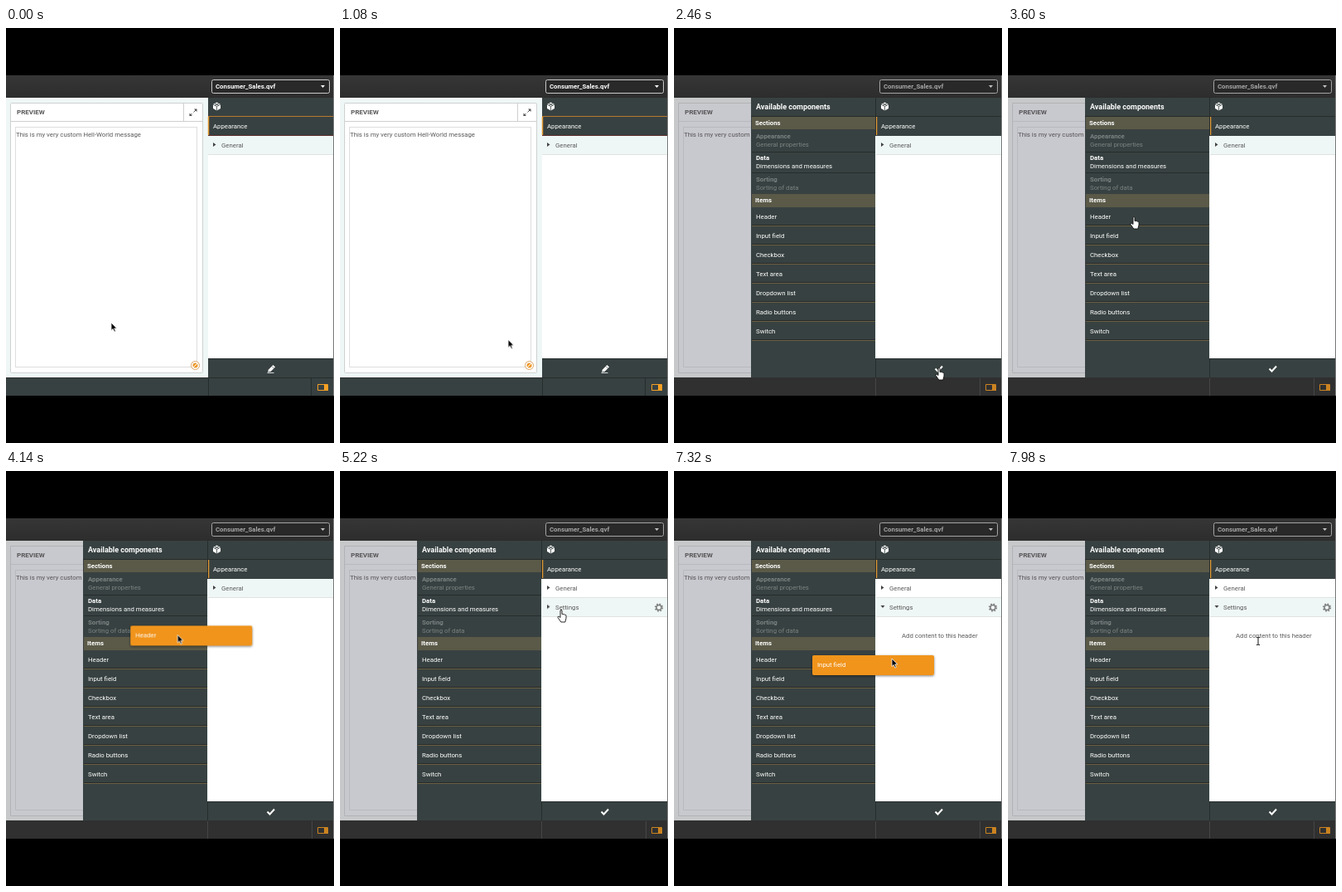
Write an HTML page that moves like this. It is 396 px wide and 500 px high and loops after 8000 ms.

```html
<!DOCTYPE html>
<html lang="en">
<head>
<meta charset="utf-8">
<title>Component editor</title>
<style>
  html, body { margin: 0; width: 100%; height: 100%; overflow: hidden; background: #000; }
  svg { display: block; width: 396px; height: 500px; font: 7.8px Roboto, Arial, sans-serif; }
  .bold { font-weight: 700; }
  .title { font-size: 9px; font-weight: 700; }
  .panel { fill: #384141; }
  .olive { fill: #5b5a48; }
  .light { fill: #fff; }
  .dim { fill: #7b8282; }
  .ink { fill: #595959; }
  .rule { fill: none; stroke: #6a5f43; }
  .dark { fill: none; stroke: #262c2c; }

  /* One shared 8 s timeline; every hard change uses step-end. */
  .step { animation: 8s step-end infinite; }
  .view { animation-name: view; }
  .edit { animation-name: edit; }
  .hover { animation-name: hover; }
  .plain { animation-name: plain; }
  .added { animation-name: added; }
  .closed { animation-name: closed; }
  .open { animation-name: open; }
  .arrow { animation-name: arrow; }
  .hand { animation-name: hand; }
  .beam { animation-name: beam; }
  .drag-header { animation-name: drag-header; }
  .drag-input { animation-name: drag-input; }
  .pointer { animation: move 8s linear infinite; }

  @keyframes view { 0% { opacity: 1 } 28%, 100% { opacity: 0 } }
  @keyframes edit { 0% { opacity: 0 } 28%, 100% { opacity: 1 } }
  @keyframes hover { 0% { opacity: 0 } 19.5% { opacity: 1 } 28%, 100% { opacity: 0 } }
  @keyframes plain { 0% { opacity: 1 } 60%, 100% { opacity: 0 } }
  @keyframes added { 0% { opacity: 0 } 60%, 100% { opacity: 1 } }
  @keyframes closed { 0% { opacity: 0 } 60% { opacity: 1 } 70%, 100% { opacity: 0 } }
  @keyframes open { 0% { opacity: 0 } 70%, 100% { opacity: 1 } }
  @keyframes arrow {
    0%, 33.5%, 47%, 72%, 83.5% { opacity: 1 }
    19.5%, 41%, 61%, 79%, 96%, 100% { opacity: 0 }
  }
  @keyframes hand {
    0%, 33.5%, 47%, 72%, 83.5%, 100% { opacity: 0 }
    19.5%, 41%, 61%, 79% { opacity: 1 }
  }
  @keyframes beam { 0% { opacity: 0 } 96%, 100% { opacity: 1 } }
  @keyframes drag-header { 0%, 60%, 100% { opacity: 0 } 47% { opacity: 1 } }
  @keyframes drag-input { 0%, 95%, 100% { opacity: 0 } 83.5% { opacity: 1 } }
  @keyframes move {
    0%, 5% { transform: translate(127px, 355px) }
    10.5% { transform: translate(156px, 362px) }
    21%, 32.5% { transform: translate(320px, 409px); animation-timing-function: ease-in-out }
    42%, 46.5% { transform: translate(152px, 227px); animation-timing-function: ease-in-out }
    57%, 60% { transform: translate(262px, 168px) }
    64%, 71% { transform: translate(267px, 167px); animation-timing-function: ease-in-out }
    80%, 83.5% { transform: translate(191px, 245px); animation-timing-function: ease-out }
    91.5%, 93% { transform: translate(263px, 226px) }
    96.5%, 100% { transform: translate(302px, 205px) }
  }
</style>
</head>
<body>
<svg viewBox="0 0 396 500">
  <defs>
    <linearGradient id="bar" x2="0" y2="1">
      <stop stop-color="#363636"/><stop offset="1" stop-color="#2d2d2d"/>
    </linearGradient>
    <filter id="shadow" x="-10%" y="-30%" width="120%" height="180%">
      <feDropShadow dx="0" dy="1" stdDeviation="1.5" flood-opacity=".5"/>
    </filter>
    <g id="tag">
      <rect width="147" height="24" rx="2" fill="#f0941c" filter="url(#shadow)"/>
    </g>
    <path id="right" d="M0-2.5 3.5 0 0 2.5z" fill="#444"/>
    <path id="down" d="M-2.5-1.5h5L0 1.5z" fill="#444"/>
  </defs>

  <rect width="396" height="500"/>
  <rect y="57" width="395" height="27" fill="url(#bar)"/>

  <!-- Preview -->
  <rect y="84" width="244" height="337" fill="#eff7f6"/>
  <rect x="5.5" y="90.5" width="232" height="325" rx="1" fill="#fff" stroke="#cdd2d1"/>
  <path d="M6 112.5h231M214.5 91v21" stroke="#cfcfcf"/>
  <rect x="11.5" y="119.5" width="219" height="289" fill="none" stroke="#dedede"/>
  <text class="bold ink" x="13" y="104" font-size="8">PREVIEW</text>
  <text class="ink" x="12" y="131">This is my very custom Hell-World message</text>
  <g fill="#505050">
    <path d="M227 97.5h3.5v3.5zM221.500 102.500v3.500h3.500z"/>
    <path d="M226.500 101.500l3-3M222 105.500l2.500-2.500" stroke="#505050"/>
  </g>
  <circle cx="228.500" cy="406.500" r="5" fill="#fff" stroke="#d9a565"/>
  <circle cx="228.500" cy="406.500" r="3" fill="#ee9a2e"/>
  <path d="M226 409l5-5" stroke="#fff"/>
  <rect class="panel" y="421" width="395" height="22"/>
  <path class="dark" d="M0 421.500h395"/>

  <!-- Properties -->
  <rect x="244" y="84" width="151" height="337" fill="#fff"/>
  <rect class="panel" x="244" y="84" width="151" height="46"/>
  <path d="M244 106.500h151" stroke="#262c2c"/>
  <g class="step view">
    <path d="M244 106.500h151" stroke="#b87830"/>
    <path d="M244 129.500h151" stroke="#5b2d2b"/>
  </g>
  <path d="M244.500 107v22" stroke="#e39a32" stroke-width="1.500"/>
  <text class="light" x="250" y="121">Appearance</text>
  <g transform="translate(254.500 94.500)">
    <path d="M0-5 4.500-2.500v5L0 5l-4.500-2.500v-5z" fill="#fff"/>
    <path d="M-4.500-2.500 0 0l4.500-2.500M0 0v5M-2.500-3.800 2.500-.9M2.500-3.800-2.500-.9" fill="none" stroke="#384141" stroke-width=".8"/>
  </g>
  <rect class="step plain" x="244" y="130" width="151" height="22" fill="#eff7f6"/>
  <path d="M244 152.500h151" stroke="#dfe3e2"/>
  <use href="#right" x="250" y="140.500"/>
  <text class="ink" x="260" y="144">General</text>

  <g class="step added">
    <rect x="244" y="153" width="151" height="22" fill="#eff7f6"/>
    <path d="M244 175.500h151" stroke="#dfe3e2"/>
    <text class="ink" x="260" y="167">Settings</text>
    <g fill="none" stroke="#7c7c7c" transform="translate(385 164.500)">
      <circle r="3" stroke-width="1.500"/>
      <circle r="4.400" stroke-width="1.500" stroke-dasharray="1.730"/>
    </g>
  </g>
  <use class="step closed" href="#right" x="250" y="163.500"/>
  <g class="step open">
    <use href="#down" x="252" y="163.500"/>
    <text class="ink" x="275" y="201">Add content to this header</text>
  </g>

  <!-- Footer -->
  <rect class="panel" x="244" y="399" width="151" height="22"/>
  <rect class="step hover olive" x="244" y="399" width="151" height="22"/>
  <path class="dark" d="M244 398.500h151M244 421.500h151M244.500 422v21M368.500 422v21"/>
  <g class="step view" transform="translate(320 411)">
    <path d="M-4 3.500-3 .5 2.500-5 5-2.500-.5 3z" fill="#fff"/>
    <path d="M-4.500 4.500h8M1-4l2.500 2.500" stroke="#fff" stroke-width=".8"/>
    <path d="M1-3.500 3.500-1" stroke="#384141" stroke-width=".7"/>
  </g>

  <!-- Edit mode -->
  <g class="step edit">
    <rect y="84" width="93" height="337" fill="#c6c8c9"/>
    <path d="M93 90.500H5.500v325H93" fill="#c8c8cf" stroke="#b1b2b5"/>
    <path d="M6 112.500h87M93 119.500H11.500v289H93" fill="none" stroke="#b8b9bd"/>
    <text class="bold" x="13" y="104" font-size="8" fill="#555">PREVIEW</text>
    <text x="12" y="131" fill="#555">This is my very custom Hell-World message</text>
    <rect y="421" width="395" height="22" fill="#303030"/>
    <path d="M243.500 422v21M369.500 422v21" stroke="#464646"/>

    <rect class="panel" x="93" y="84" width="150" height="337"/>
    <path class="dark" d="M243.500 84v46M243.500 398v23M93 106.500h150"/>
    <rect class="olive" x="94" y="107" width="149" height="15"/>
    <rect class="olive" x="94" y="200" width="149" height="16"/>
    <path class="dark" d="M94 149.500h149M94 174.500h149"/>
    <path class="dark" d="M94 237.500h149m-149 23h149m-149 23h149m-149 23h149m-149 23h149m-149 23h149m-149 23h149"/>
    <path class="rule" d="M94 238.500h149m-149 23h149m-149 23h149m-149 23h149m-149 23h149m-149 23h149m-149 23h149"/>
    <g class="light">
      <text class="title" x="99" y="98">Available components</text>
      <text class="bold" x="98" y="117">Sections</text>
      <text class="bold dim" x="99" y="133">Appearance</text>
      <text class="dim" x="99" y="143">General properties</text>
      <text class="bold" x="99" y="159">Data</text>
      <text x="99" y="169">Dimensions and measures</text>
      <text class="bold dim" x="99" y="185">Sorting</text>
      <text class="dim" x="99" y="195">Sorting of data</text>
      <text class="bold" x="98" y="210">Items</text>
      <text x="99" y="230">Header</text>
      <text x="99" y="253">Input field</text>
      <text x="99" y="276">Checkbox</text>
      <text x="99" y="299">Text area</text>
      <text x="99" y="322">Dropdown list</text>
      <text x="99" y="345">Radio buttons</text>
      <text x="99" y="368">Switch</text>
    </g>
    <path d="M315.500 410.500l3 3 5.500-6" fill="none" stroke="#fff" stroke-width="2"/>
  </g>

  <!-- File menu and panel toggle -->
  <g class="step view">
    <rect x="248.500" y="62.500" width="142" height="16" rx="2" fill="#292929" stroke="#c9c9c9"/>
    <text class="bold light" x="253" y="73">Consumer_Sales.qvf</text>
    <path d="M380 69h5l-2.500 3z" fill="#fff"/>
    <path d="M376.500 429.500h12v7h-12z" fill="none" stroke="#f5a024"/>
    <path d="M384 430h5v7h-5z" fill="#f5a024"/>
  </g>
  <g class="step edit">
    <rect x="248.500" y="62.500" width="142" height="16" rx="2" fill="#292929" stroke="#a4a4a4"/>
    <text class="bold" x="253" y="73" fill="#a6a6a6">Consumer_Sales.qvf</text>
    <path d="M380 69h5l-2.500 3z" fill="#c4c4c4"/>
    <path d="M376.500 429.500h12v7h-12z" fill="none" stroke="#cb8320"/>
    <path d="M384 430h5v7h-5z" fill="#cb8320"/>
  </g>
  <path d="M395.500 57v386" stroke="#777"/>

  <!-- Pointer with dragged items -->
  <g class="pointer">
    <g class="step drag-header" transform="translate(-57 -11)">
      <use href="#tag"/><text class="light" x="6" y="14">Header</text>
    </g>
    <g class="step drag-input" transform="translate(-96 -4)">
      <use href="#tag"/><text class="light" x="6" y="14">Input field</text>
    </g>
    <path class="step arrow" d="M0 0v9.500l2.200-2 1.600 3.600 1.600-.7-1.600-3.500h3z" stroke="#fff" stroke-width=".8"/>
    <path class="step hand" d="M-1 1Q0-.5 1 1V5.500q1.200-.8 1.800.3 1.200-.6 1.700.5 1.500-.3 1.500 1v3L4.800 15H-.2L-4 9.500q-.3-1.700 1.300-1.200L-1 9.500z" fill="#fff" stroke="#111" stroke-width=".9"/>
    <path class="step beam" d="M-2-4.500H-.7L0-4 .7-4.500H2M0-4v8M-2 4.500H-.7L0 4l.7.500H2" fill="none" stroke="#111"/>
  </g>
</svg>
</body>
</html>
```
